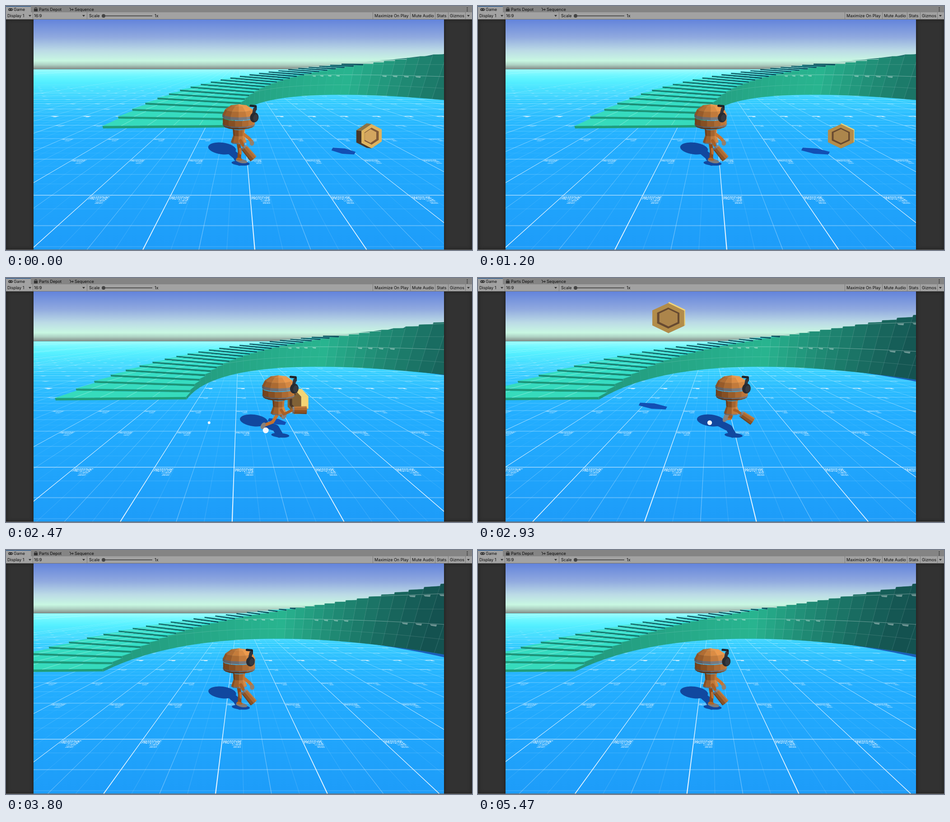
Write an HTML page with a canvas that moves like this. It is 1032 px wide and 543 px high and loops after 5590 ms.

```html
<!DOCTYPE html>
<html lang="en">
<head>
<meta charset="utf-8">
<title>Game view</title>
<style>
  html, body { margin: 0; width: 100%; height: 100%; overflow: hidden; background: #323232; }
  #stage { position: relative; width: 1032px; height: 543px; overflow: hidden; font: 9px/14px Inter, "Liberation Sans", sans-serif; color: #080808; }
  canvas { position: absolute; left: 61px; top: 30px; }
  .side { position: absolute; top: 30px; height: 512px; background: #323232; box-shadow: inset 0 0 9px #1c1c1c; }
  .bar { position: absolute; left: 0; width: 1032px; }
  .tabs { top: 0; height: 14px; background: #848484; }
  .tools { top: 14px; height: 15px; background: #a2a2a2; border-bottom: 1px solid #747474; }
  .foot { top: 542px; height: 1px; background: #686868; }
  .tab { position: absolute; left: 0; top: 0; width: 55px; height: 14px; background: #a2a2a2; box-shadow: inset 0 1.5px #2e5b8d; }
  .bar span { position: absolute; top: 1px; white-space: nowrap; }
  .bar i { position: absolute; top: 0; width: 1px; height: 15px; background: #7a7a7a; }
  .bar b { position: absolute; top: 6px; border: 3px solid transparent; border-top: 4px solid #363636; border-bottom: 0; }
  .track { position: absolute; left: 216px; top: 7px; width: 108px; height: 1.5px; background: #525252; }
  .knob { position: absolute; left: 212px; top: 4px; width: 8px; height: 8px; border-radius: 50%; background: #444; }
  svg { position: absolute; left: 0; top: 0; }
</style>
</head>
<body>
<div id="stage">
  <div class="bar tabs">
    <div class="tab"></div>
    <svg width="1032" height="14" fill="#333">
      <rect x="5" y="5" width="10" height="6" rx="3"/>
      <circle cx="7.7" cy="8" r="1" fill="#aaa"/><circle cx="12.2" cy="8" r="1" fill="#aaa"/>
      <path d="M62 6h8v6h-8z"/><path d="M64 6V3.5h4V6" fill="none" stroke="#333"/>
      <path d="M141 4l3 4h5M144 8l-2 3M147 6l2 2-2 2" fill="none" stroke="#333" stroke-width="1.3"/>
      <path d="M1021.500 3v9" stroke="#333" stroke-width="2" stroke-dasharray="2 1.500"/>
    </svg>
    <span style="left:17px">Game</span>
    <span style="left:73px">Parts Depot</span>
    <span style="left:152px">Sequence</span>
  </div>
  <div class="bar tools">
    <span style="left:3px">Display 1</span><b style="left:50px"></b><i style="left:59px"></i>
    <span style="left:62px">16:9</span><b style="left:169px"></b><i style="left:179px"></i>
    <span style="left:184px">Scale</span><div class="track"></div><div class="knob"></div>
    <span style="left:329px">1x</span><i style="left:812px"></i>
    <span style="left:816px">Maximize On Play</span><i style="left:895px"></i>
    <span style="left:899px">Mute Audio</span><i style="left:950px"></i>
    <span style="left:954px">Stats</span><i style="left:979px"></i>
    <span style="left:983px">Gizmos</span><i style="left:1017px"></i><b style="left:1021px"></b>
  </div>
  <div class="side" style="left:0;width:61px"></div>
  <div class="side" style="left:970px;width:62px"></div>
  <canvas id="view" width="909" height="512"></canvas>
  <div class="bar foot"></div>
</div>
<script>
const g = document.getElementById('view').getContext('2d');
const LOOP = 5590, RATE = 15;
const RAD = Math.PI / 180;
const { sin, cos, abs, max, min, floor, hypot, sqrt, sign, exp, PI } = Math;
const lerp = (a, b, k) => a + (b - a) * k;
const clamp = v => max(0, min(1, v));
const rgb = (a, b, k) => `rgb(${a.map((v, i) => Math.round(lerp(v, b[i], k)))})`;
const white = a => `rgba(255,255,255,${a})`;

// The hero runs a fixed distance; the camera follows a moment later
const travel = t => 3.356 * (1 - exp(-.771 * max(0, t - 1.635) ** 3));
const camAt = t => t < 1.85 ? 0 : travel(t);
const heroAt = t => t < 1.85 ? 0 : travel(t + .185);

// Camera: 60 degree view, pitched down
const FOCAL = 443, EYE = 1.58, S = .3396, C = .9406, MID = 515.5, HORIZON = 126, CELL = 133;
let cam = 0;
function proj(X, Y, Z) {
  const d = EYE - Y, z = Z * C + d * S;
  return [MID + FOCAL * (X - cam) / z, 286 + FOCAL * (d * C - Z * S) / z];
}
function trace(pts) {
  g.beginPath();
  pts.forEach(p => g.lineTo(p[0], p[1]));
}
function line(pts, stroke, width = 1) {
  trace(pts);
  g.strokeStyle = stroke; g.lineWidth = width; g.stroke();
}
function poly(pts, fill, seam) {
  trace(pts);
  g.closePath();
  g.fillStyle = fill; g.fill();
  if (seam) { g.strokeStyle = fill; g.lineWidth = seam; g.stroke(); }
}
function oval(x, y, rx, ry, fill, turn = 0) {
  g.beginPath(); g.ellipse(x, y, rx, ry, turn, 0, 7);
  g.fillStyle = fill; g.fill();
}
function band(y0, y1, stops) {
  const f = g.createLinearGradient(0, y0, 0, y1);
  stops.forEach(([k, col]) => f.addColorStop(k, col));
  g.fillStyle = f;
  g.fillRect(61, y0, 909, y1 - y0);
}

function backdrop() {
  band(30, 142, [[0, '#6384db'], [.35, '#90a9df'], [.62, '#bcdbe6'], [.82, '#c8f7e2'], [.9, '#aed2c4'], [1, '#7b827e']]);
  band(141, 542, [[0, '#66fbff'], [.06, '#4bf0ff'], [.15, '#35d2ff'], [.25, '#2abdff'], [.4, '#23aeff'], [1, '#1d9cf9']]);
}

const ROW = 2.111, COL = .143;
const kind = q => q % 4 === 0 ? 0 : q % 2 === 0 ? 1 : 2;
const TONE = [.9, .36, .13];
function grid() {
  for (let q = -3; q < 190; q++) {
    const k = kind(q), Z = ROW + q / 4;
    if (k && Z > 16 / k) continue;
    const y = proj(0, 0, Z)[1], w = 791 / (Z + .57) ** 2 * .011;
    line([[61, y], [970, y]], white(TONE[k] * (Z > 12 ? .35 : .8)), max(k ? .7 : .5, w));
  }
  for (let q = -208; q <= 208; q++) {
    const k = kind(q), X = COL + floor(cam) + q / 4, far = k ? 20 : 48;
    if (k && abs(q) > 90 / k) continue;
    const h = k ? .0028 : .0046;
    poly([proj(X - h, 0, 1.2), proj(X + h, 0, 1.2), proj(X + h * 1.8, 0, far), proj(X - h * 1.8, 0, far)], white(TONE[k]));
  }
}

// Printed labels lying on the floor
function labels() {
  const small = 'bold 5px "Liberation Sans", sans-serif';
  for (let r = 0; r < 13; r++) for (let n = -22; n <= 22; n++) {
    const X = COL + floor(cam) + n + .012, Z = ROW + r - .015;
    const [x, y] = proj(X, 0, Z);
    if (x < 0 || x > 975) continue;
    const a = proj(X + .1, 0, Z), b = proj(X, 0, Z - .1);
    g.save();
    g.transform((a[0] - x) * 10, 0, (b[0] - x) * 10, (b[1] - y) * 10, x, y);
    g.fillStyle = white(r < 5 ? .85 : .5);
    if (r < 4) {
      g.scale(.0038, .0088);
      g.font = 'bold 10px "Liberation Sans", sans-serif';
      g.textAlign = 'left';
      g.fillText('PROTOTYPE', 0, 7.6);
      g.textAlign = 'right';
      g.font = small;
      g.fillText('1 x 1 METER', 61, 12);
      g.fillText('GRID BOX', 61, 16.5);
    } else {
      g.fillRect(.01, .01, .22, .065);
      g.fillRect(.13, .085, .1, .05);
    }
    g.restore();
  }
}

// Spiral staircase around a centre point
const HUB = [5.35, 5.06], IN = 5.5, OUT = 8.8, TURN = 4.55, RISE = .066, FIRST = -1.5;
const spot = (r, deg, Y) => proj(HUB[0] - r * cos(deg * RAD), Y, HUB[1] + r * sin(deg * RAD));
function wallTone(deg) {
  const m = deg < 90 ? .72 + .28 * clamp(deg / 90) : 1 - clamp((deg - 92) / 62);
  return rgb([20, 82, 80], [40, 180, 143], m);
}
function step(k) {
  const a = k * TURN + FIRST, b = a + TURN, low = k * RISE, top = low + RISE;
  poly([spot(IN, a, top), spot(OUT, a, top), spot(OUT, b, top), spot(IN, b, top)],
    k < 22 ? rgb([54, 219, 188], [52, 230, 226], clamp(a / 70)) : '#1f6f6c');
  if (k < 20) for (let i = 1; i < 5; i++) {
    const r = lerp(IN, OUT, i / 5 + .06);
    line([spot(r, a, top), spot(r, b, top)], white(.45), .8);
  }
  if (a < 100) poly([spot(IN, a, low), spot(OUT, a, low), spot(OUT, a, top), spot(IN, a, top)],
    rgb([31, 158, 122], [13, 84, 96], clamp(a / 62)));
  poly([spot(IN, a, 0), spot(IN, b, 0), spot(IN, b, top), spot(IN, a, top)], wallTone(a + TURN / 2), .6);
  line([spot(IN, a, 0), spot(IN, a, top)], white(.18), .7);
  for (let Y = .5; Y < top; Y += .5) {
    line([spot(IN, a, Y), spot(IN, b, Y)], white(Y % 1 ? .18 : .45), .8);
    if (Y % 1 === 0 && k > 14 && k % 8 < 4)
      poly([spot(IN, a + .5, Y - .02), spot(IN, a + 2.6, Y - .02), spot(IN, a + 2.6, Y - .09), spot(IN, a + 1, Y - .07)], white(.38));
  }
}
function stairs() {
  const wall = [], edge = [];
  for (let d = 138; d <= 186; d += 4) {
    wall.push(spot(IN, d, 0));
    edge.unshift(spot(IN - (d - 136) * .019, d, 0));
  }
  poly(wall.concat(edge), '#1b5fb9');
  const order = Array.from({ length: 44 }, (_, k) => k).sort((p, q) => abs(p - 20) - abs(q - 20));
  order.forEach(step);
}

// Coin: spins in place, then is knocked up along a parabola
const GRAB = 2.46, PEAK = 3.05;
function coin(t) {
  if (t > 2 * PEAK - GRAB) return;
  const top = t < GRAB ? 262 : 46.5 + 590 * (t - PEAK) ** 2;
  const h = clamp((262 - top) / 200), s = 1 + .24 * h;
  const x = MID + CELL * s * (2.17 - cam), y = top + 27 * s;
  const yaw = (38 - 185 * t - 85 * max(0, t - GRAB)) * RAD, sy = sin(yaw), cy = cos(yaw);
  const hex = Array.from({ length: 6 }, (_, i) => [33 * sin(i * PI / 3), -27 * cos(i * PI / 3)]);

  const w = 1 / lerp(.00508, .00629, h);
  const sx = MID + (1.98 - .6 * h - cam) * w * .595, wide = lerp(.25, 1.05, abs(cy));
  poly(hex.map(([px, py]) => [sx + px * wide - py * .12, HORIZON + w + py * .22 + px * .16]), '#124fb4');

  const at = (p, z, k = 1) => [x + s * (p[0] * k * cy + z * sy), y + s * (p[1] * k + (z * cy - p[0] * k * sy) * .1)];
  const face = cy >= 0 ? 9 : -9;
  hex.forEach((p, i) => {
    const q = hex[(i + 1) % 6], nx = p[0] + q[0], ny = p[1] + q[1], n = hypot(nx, ny);
    if (-nx * sy <= 0) return;
    poly([at(p, 9), at(q, 9), at(q, -9), at(p, -9)], rgb([72, 54, 40], [243, 212, 116], clamp(.5 + .5 * nx * cy / n - .45 * ny / n - .4 * sy)), .5);
  });
  const lit = clamp(.6 + .6 * sy * sign(cy));
  const shape = (z, k, dark, light) => poly(hex.map(p => at(p, z, k)), rgb(dark, light, lit));
  shape(face, 1, [120, 88, 46], [225, 182, 96]);
  shape(face, .7, [70, 52, 38], [130, 92, 58]);
  shape(face * .55, .57, [120, 90, 50], [214, 168, 96]);
}

function puffs(t) {
  for (let i = 0; i < 4; i++) {
    const born = 2.08 + .32 * i, age = (t - born) / .47;
    if (age < 0 || age >= 1) continue;
    const w = i % 2 ? 213 : 196, r = 7 * sqrt(1 - age);
    oval(MID + (heroAt(born) + .05 - cam) * w * .595, HORIZON + w, r, r, '#f4f9ff');
  }
}

// Faceted solid of revolution: rings of [y, radius], lit from the upper right
const WOOD = [[92, 48, 18], [238, 154, 76]], STEEL = [[82, 78, 80], [166, 164, 166]];
function lathe(rings, tones, tilt = .2, sides = 6) {
  for (let i = 0; i + 1 < rings.length; i++) for (let j = 0; j < sides; j++) {
    const [y0, r0] = rings[i], [y1, r1] = rings[i + 1];
    const at = (y, r, k) => { const a = (k / sides - .5) * PI; return [r * sin(a), y + r * tilt * cos(a)]; };
    const facing = ((j + .5) / sides - .5) * PI, up = (r1 - r0) / hypot(r1 - r0, y1 - y0);
    poly([at(y0, r0, j), at(y0, r0, j + 1), at(y1, r1, j + 1), at(y1, r1, j)],
      rgb(...tones, clamp(.42 + .3 * sin(facing) + .45 * up)), .5);
  }
}
function limb(pts, color, width) {
  g.lineCap = g.lineJoin = 'round';
  line(pts, color, width);
  g.lineCap = 'butt';
}
function sleeve(x, y, turn, len) {
  g.save();
  g.translate(x, y); g.rotate(turn - PI / 2);
  lathe([[0, 7], [4, 7.5]], STEEL, .1, 4);
  lathe([[4, 7.5], [len, 8.5]], WOOD, .1, 4);
  g.restore();
}
function legs(run, q) {
  if (!run) {
    limb([[-1, 304], [2, 322], [1, 340]], '#8a4b1d', 8);
    limb([[3, 318], [4, 328]], '#bf7030', 5);
    oval(6, 345, 13, 4.5, '#7d7b7c', .2);
    oval(1, 341, 7, 3, '#b06729', .2);
    return;
  }
  [[-12 - 22 * sin(q), 328 + 15 * cos(q)], [-2 + 18 * sin(q + .7), 314 + 10 * cos(q + .85)]].forEach(([x, y], i) => {
    limb([[0, 300], [x * .5 + 4, y * .5 + 156], [x, y]], i ? '#a35a22' : '#c27231', 7);
    oval(x, y, 5, 8, '#85817f', .5);
  });
}
function arms(run, q) {
  if (!run) {
    limb([[12, 286], [22, 294], [29, 302]], '#c57532', 7);
    oval(29, 305, 5, 6, '#91806f');
    limb([[4, 300], [9, 310]], '#a85f26', 7);
    sleeve(10, 313, .88, 35);
    return;
  }
  const m = sin(q) ** 2, x = lerp(20, 31, m), y = lerp(304, 296, m);
  limb([[6, 296], [12, lerp(298, 305, m)], [x, y]], '#a85f26', 6);
  sleeve(x, y, .6 * (1 - m), 31);
}
function robot(t) {
  const lead = (heroAt(t) - cam) * CELL, run = lead > 26;
  const q = (t - 2) / .376 * 2 * PI;
  g.save();
  g.translate(MID + lead, 0);

  const shade = '#11489f', slide = -.2 * lead;
  oval(-37 + slide, 317, 31, 13, shade, .12);
  limb([[-20 + slide, 322], [-6, 334], [2, 348]], shade, 15);
  oval(4, 350, 20, 5, shade, .08);

  legs(run, q);
  g.translate(0, run ? -2 : .7 * sin(t * 5.2));
  lathe([[274, 13], [288, 12], [302, 17]], WOOD, .2, 4);
  lathe([[302, 17], [304, 17]], STEEL, .2, 4);
  arms(run, q);

  lathe([[219, 0], [221, 17], [230, 30], [242, 36]], WOOD);
  lathe([[249, 35], [263, 35]], WOOD, .2, 7);
  lathe([[241, 36], [247, 36]], STEEL);
  lathe([[262, 36], [267, 34]], STEEL);
  lathe([[267, 34], [271, 24]], WOOD, .15);

  const e = 30 + 5 * sin(2.33 * (t - 1.8));
  limb([[e - 8, 222], [e + 3, 223], [e + 3, 230]], '#1e2127', 5);
  limb([[e + 1, 229], [e - 1, 238]], '#31353c', 7);
  oval(e, 248, 9.5, 11, '#282b31', .15);
  oval(e + 3, 249, 5.5, 8, '#363a41', .15);
  g.restore();
}

function draw(t) {
  cam = camAt(t);
  g.setTransform(1, 0, 0, 1, -61, -30);
  backdrop();
  grid();
  labels();
  stairs();
  coin(t);
  robot(t);
  puffs(t);
}

// The picture holds for uneven beats: three changes in every seven ticks
function beat(ms) {
  const u = floor((ms + 5) * RATE / 1000), r = u % 7;
  return max(0, r < 2 ? u - r - 1 : u - r % 2);
}
let shown = -1;
function frame(now) {
  const u = beat(now % LOOP);
  if (u !== shown) draw((shown = u) / RATE);
  requestAnimationFrame(frame);
}
draw(0);
requestAnimationFrame(frame);
</script>
</body>
</html>
```
